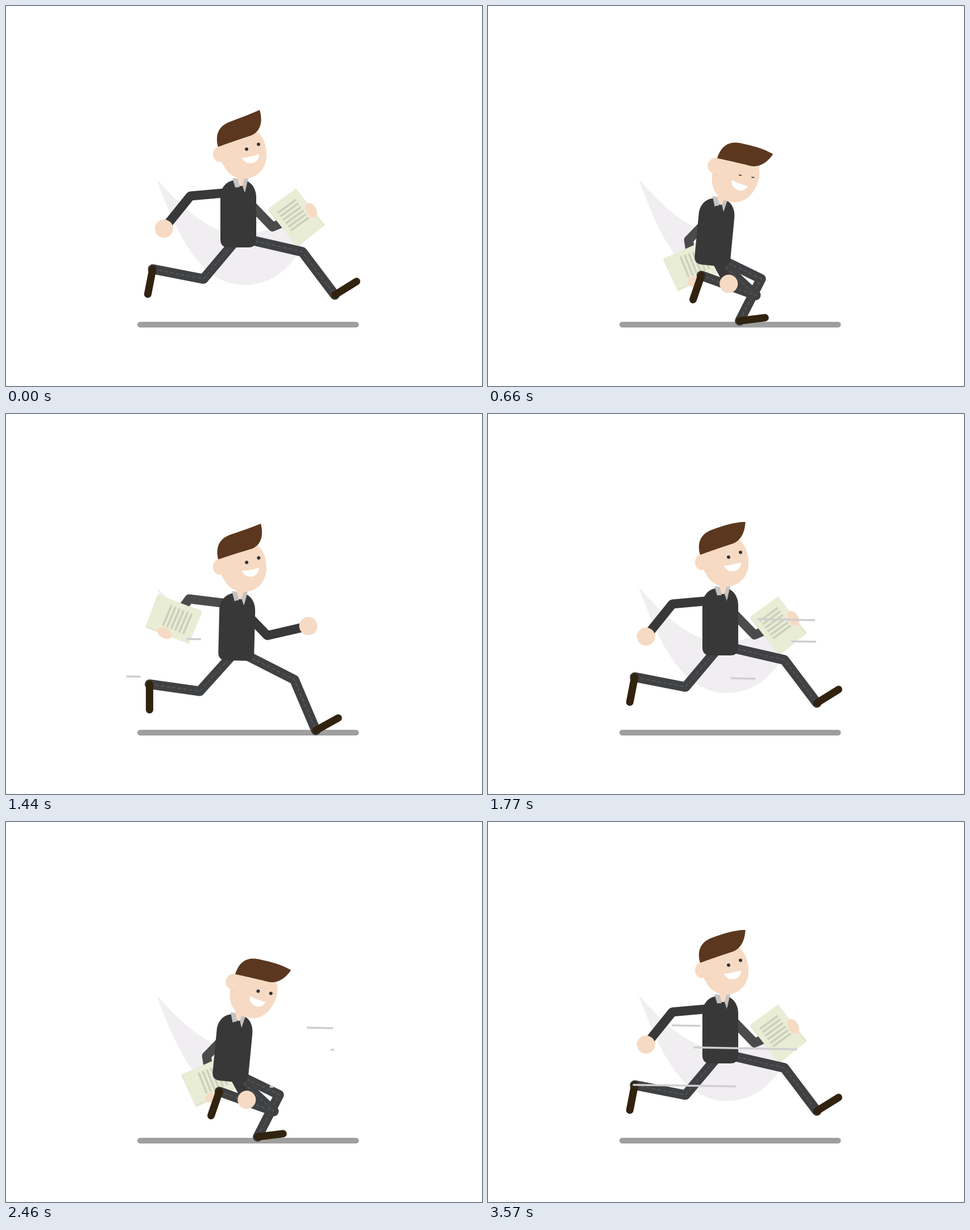
An HTML page with a canvas that plays this animation: 837 px wide and 669 px high, repeating every 3600 ms.

```html
<!DOCTYPE html>
<html lang="en">
<head>
<meta charset="utf-8">
<title>Running man</title>
<style>
html, body { margin: 0; width: 100%; height: 100%; overflow: hidden; background: #fff; }
canvas { display: block; }
</style>
</head>
<body>
<canvas id="stage" width="837" height="669"></canvas>
<script>
const ctx = document.getElementById('stage').getContext('2d');
const LOOP = 3600, STEP = 450, HOLD = 30, TICK = 30, RAD = Math.PI / 180;
const FLOOR = 557, SHIN_TO_TOE = 45, FOREARM = 74;
const SKIN = '#f7dac3', SUIT = '#383838', TROUSER = '#404143', SLEEVE = '#4b4b4c', SHOE = '#31230f';

// Each step runs leap, contact, crouch, push; the leap is held for a moment.
const BEATS = [0, 90, 210, 330];

const clamp = x => Math.max(0, Math.min(1, x));
const smooth = x => x * x * (3 - 2 * x);
const mod = (a, n) => (a % n + n) % n;

// Periodic monotone cubic curve through one row of values per beat.
function track(rows) {
  const period = rows.length / BEATS.length * STEP;
  const keys = rows.flatMap((v, i) => {
    const beat = i % BEATS.length;
    const t = (i - beat) / BEATS.length * STEP + BEATS[beat];
    return beat ? [{ t, v }] : [{ t: t - HOLD, v }, { t, v }];
  });
  const n = keys.length;
  const value = (i, c) => keys[mod(i, n)].v[c];
  const time = i => keys[mod(i, n)].t + Math.floor(i / n) * period;
  const slope = (i, c) => (value(i + 1, c) - value(i, c)) / (time(i + 1) - time(i));
  const tangent = (i, c) => {
    const a = slope(i - 1, c), b = slope(i, c);
    return a * b > 0 ? 2 * a * b / (a + b) : 0;
  };
  return t => {
    t = mod(t + HOLD, period) - HOLD;
    let i = n - 1;
    while (time(i) > t) i--;
    const span = time(i + 1) - time(i), s = (t - time(i)) / span;
    return rows[0].map((_, c) =>
      value(i, c) + (value(i + 1, c) - value(i, c)) * smooth(s) +
      span * s * (1 - s) * ((1 - s) * tangent(i, c) - s * tangent(i + 1, c)));
  };
}

// hip x, hip y, lean, nod
const body = track([
  [409, 425, 0, 0], [405, 434, 1.4, 1.5], [394, 457, 5.5, 32], [398, 449, 3.3, 32]
]);
// thigh angle and length, shin angle and length, foot angle
const stride = track([
  [13, 115, 53, 95, -32], [27, 114, 67, 97, -29], [26, 94, 117, 83, -7], [126, 94, 189, 85, 85],
  [130, 96, 191, 91, 101], [132, 97, 188, 89, 90], [43, 103, 200, 102, 109], [-4, 103, 62, 86, -26]
]);
// upper arm angle and length, forearm angle
const swing = track([
  [175, 85, 129], [187, 86, 126], [134, 73, 81], [48, 71, -16],
  [46, 86, -23], [46, 75, -13], [103, 66, 62], [184, 85, 107]
]);

const reach = ([x, y], degrees, length) =>
  [x + Math.cos(degrees * RAD) * length, y + Math.sin(degrees * RAD) * length];

// Point on the spine, measured up from the bottom of the torso.
function spine(t, up) {
  const [x, y, lean] = body(t);
  return reach([x, y], lean - 90, up);
}

function line(points, color, width, cap = 'round') {
  ctx.beginPath();
  points.forEach(p => ctx.lineTo(...p));
  ctx.strokeStyle = color;
  ctx.lineWidth = width;
  ctx.lineCap = cap;
  ctx.lineJoin = 'round';
  ctx.stroke();
}
function fill(path, color) {
  ctx.fillStyle = color;
  ctx.fill(new Path2D(path));
}
function oval(x, y, rx, ry, color, degrees = 0) {
  ctx.beginPath();
  ctx.ellipse(x, y, rx, ry, degrees * RAD, 0, 7);
  ctx.fillStyle = color;
  ctx.fill();
}
// Draws with the point (ox, oy) moved to (x, y) and turned.
function place([x, y], degrees, draw, ox = 0, oy = 0) {
  ctx.save();
  ctx.translate(x, y);
  ctx.rotate(degrees * RAD);
  ctx.translate(-ox, -oy);
  draw();
  ctx.restore();
}

function drawLeg(t, shift) {
  const [thigh, thighLen, shin, shinLen, foot] = stride(t + shift);
  const ground = ([x, y]) => [x, Math.min(y, FLOOR)];
  const hip = spine(t, 18);
  const knee = reach(hip, thigh, thighLen);
  const ankle = ground(reach(knee, shin, shinLen));
  const toe = ground(reach(ankle, foot, SHIN_TO_TOE));
  line([hip, knee, ankle], TROUSER, 17);
  ctx.setLineDash([6, 4]);
  line([hip, knee, ankle], '#696b6d', 1, 'butt');
  ctx.setLineDash([]);
  line([ankle, toe], SHOE, 13);
}

function armJoints(t, shift) {
  const [upper, upperLen, fore] = swing(t + shift);
  const shoulder = spine(t, 98);
  const elbow = reach(shoulder, upper, upperLen);
  return { joints: [shoulder, elbow, reach(elbow, fore, FOREARM)], fore };
}

function drawNearArm(t) {
  const { joints } = armJoints(t, 0);
  line(joints, SUIT, 16);
  oval(...joints[2], 16, 16, SKIN);
}

// Swoosh left by the paper, shown only behind its current angle.
function drawTrail([x, y]) {
  ctx.save();
  ctx.beginPath();
  ctx.moveTo(400, 340);
  ctx.arc(400, 340, 400, Math.atan2(y - 340, x - 400), 215 * RAD);
  ctx.clip();
  fill('M265 305C310 355 360 405 420 402C455 400 480 385 495 372L520 425' +
    'C495 470 460 491 420 491C340 491 300 400 265 305Z', '#f0eef0');
  ctx.restore();
}

function drawPaper() {
  place([0, 0], -2.5, () => {
    ctx.fillStyle = '#e2e6cc';
    ctx.fillRect(-40, -31.5, 82, 62);
  });
  ctx.fillStyle = '#e9edd6';
  ctx.fillRect(-41, -30, 82, 60);
  ctx.fillStyle = '#cdd1bc';
  for (let i = 0; i < 6; i++) ctx.fillRect(-27 + i * 7.7, -18, 3.8, 39);
  oval(6, -29, 14, 9, SKIN, 8);
}

function drawFarArm(t) {
  const { joints, fore } = armJoints(t, STEP), turn = fore + 77;
  const middle = reach(reach(joints[2], turn, -6), turn - 90, -29);
  drawTrail(middle);
  line(joints, SLEEVE, 16);
  place(middle, turn, drawPaper);
}

function drawTorso(t) {
  place(spine(t, 0), body(t)[2], () => {
    fill('M377 337C377 321 386 310 399 307H421C433 311 440 323 440 337V411' +
      'Q440 425 426 425H391Q377 425 377 411Z', SUIT);
    fill('M407 296H419V312Q418 317 413 317Q408 317 407 312Z', SKIN);
    fill('M398 303L407 304L411 317L406 329ZM426 303L419 304L416 317L420 329Z', '#c3c3c4');
  }, 409, 425);
}

function drawHead(t) {
  const nod = body(t)[3], [x, y] = spine(t, 117), h = t % STEP;
  const flop = clamp((h - 90) / 120) * clamp((STEP - h) / HOLD);
  const eye = t >= 630 && t < 720 ? 0.9 : 3;
  place([x + 5 - nod * 0.13, y], nod, () => {
    oval(377, 261, 13, 14, SKIN);
    fill('M374 247L436 218C452 226 458 245 458 262C458 288 440 304 418 304' +
      'C398 304 385 290 379 272Z', SKIN);
    line([[380, 277], [389, 274]], '#eccab4', 1);
    fill(`M373 248C366 222 378 209 396 203C412 197 ${430 + 4 * flop} 190 ` +
      `${446 + 6.5 * flop} ${183 + 7 * flop}C452 203 448 221 431 228C418 232 395 240 373 248Z`, '#5b371f');
    oval(423, 252, 3, eye, '#333', -22);
    oval(444, 243.5, 3, eye, '#333', -22);
    fill('M415 267Q431 266 445 261Q444 276 431 277Q419 277 415 267Z', '#fff');
  }, 414, 308);
}

// Wind streaks: x1, y1, x2, y2, lead in ms.
const streaks = [[575, 363, 318, 358, 95], [577, 401, 317, 396, 0], [470, 466, 211, 462, 0]];
const gusts = [934, 1650, 2430, 3180];

function drawWind(t) {
  for (const [x1, y1, x2, y2, lead] of streaks) {
    const point = k => [x1 + (x2 - x1) * k, y1 + (y2 - y1) * k];
    for (const start of gusts) {
      const age = t - start + lead, f = clamp(age / 510);
      const front = 0.3 * f + 0.7 * smooth(f), tail = smooth(clamp((age - 345) / 200));
      if (front > tail) line([point(tail), point(front)], '#d1ced1', 3.5, 'butt');
    }
  }
}

function draw(t) {
  ctx.fillStyle = '#fff';
  ctx.fillRect(0, 0, 837, 669);
  line([[236, 561], [615.5, 561]], '#9f9f9f', 10);
  drawFarArm(t);
  drawLeg(t, STEP);
  drawLeg(t, 0);
  drawTorso(t);
  drawHead(t);
  drawNearArm(t);
  drawWind(t);
}

let origin;
function tick(now) {
  origin ??= now;
  draw(Math.floor((now - origin) % LOOP / TICK) * TICK);
  requestAnimationFrame(tick);
}
draw(0);
requestAnimationFrame(tick);
</script>
</body>
</html>
```
